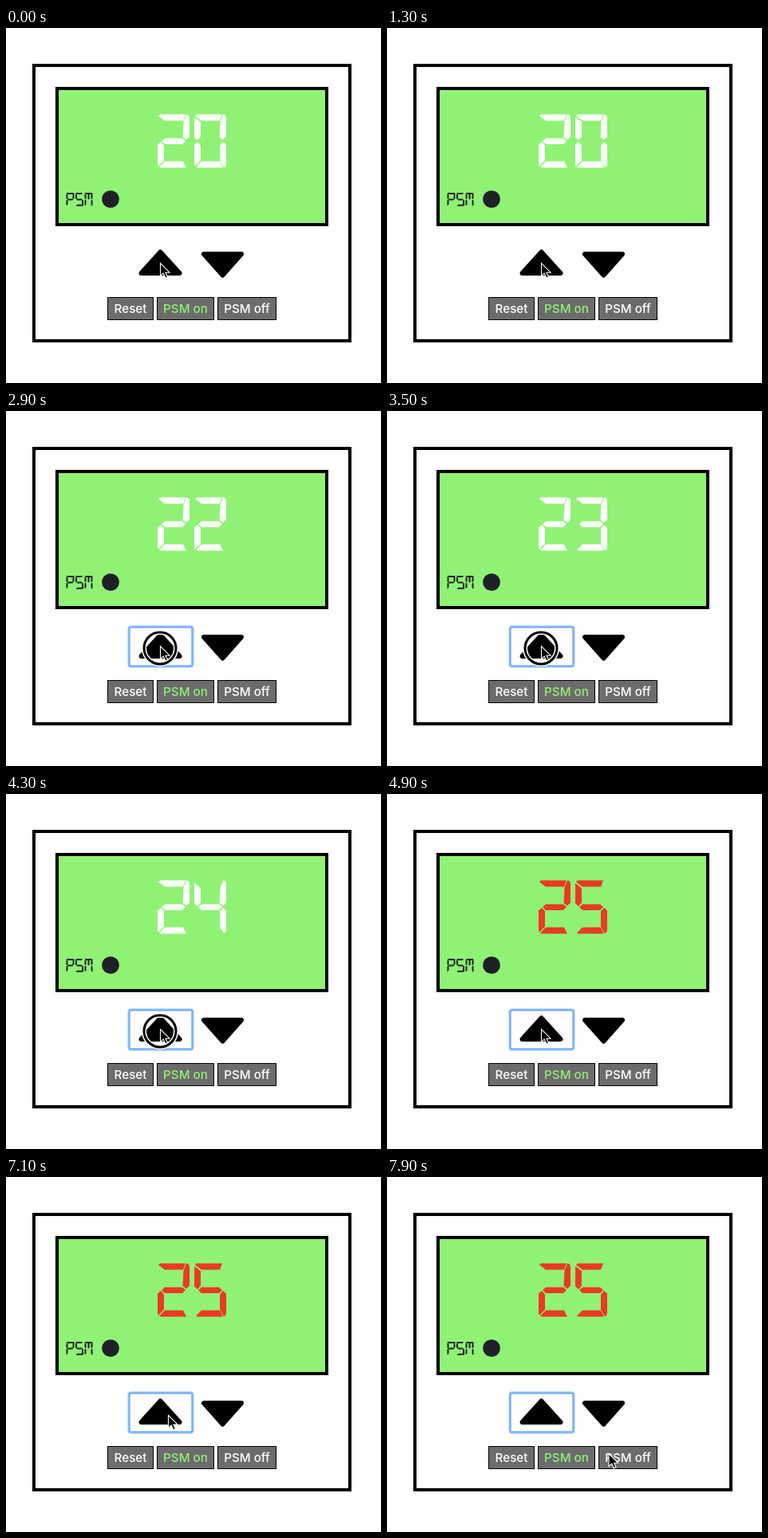
Recreate the animation shown at these times as an HTML page. Size 470 by 446 pixels, loop 8000 ms.

```html
<!DOCTYPE html>
<html lang="en">
<head>
<meta charset="utf-8">
<title>Thermostat</title>
<style>
  html, body { margin: 0; width: 100%; height: 100%; overflow: hidden; background: #fff; }
  svg { display: block; }
  .button rect { fill: #6c6c6c; stroke: #000; }
  .button text { font: 500 15.2px Inter, sans-serif; fill: #fff; text-anchor: middle; }
  .button.on text { fill: #8ff275; }
  .arrow { stroke: #000; stroke-width: 6; stroke-linejoin: round; }
  .ring, .focus { fill: none; }
</style>
</head>
<body>
<svg width="470" height="446" viewBox="0 0 470 446">
  <rect x="35" y="47" width="396" height="346" fill="#fff" stroke="#000" stroke-width="4"/>
  <rect x="64" y="76" width="338" height="171" fill="#8ff275" stroke="#000" stroke-width="4"/>
  <path id="tens" transform="translate(190 108.5)"/>
  <path id="units" transform="translate(236 108.5)"/>
  <g id="label" fill="#202124" aria-label="PSM"></g>
  <circle cx="131" cy="215" r="10.8" fill="#202028"/>

  <path class="arrow" d="M193.5 281.5 217.5 308H169.5Z"/>
  <path class="arrow" d="M248 284H295L271.5 310.5Z"/>
  <g id="focus" class="focus">
    <rect x="154" y="271" width="80" height="50" rx="2.5" stroke="#b5d3fa" stroke-width="3.5"/>
    <rect x="154.5" y="271.5" width="79" height="49" rx="2" stroke="#72adf6" stroke-width="2"/>
  </g>

  <g class="button"><rect x="127.5" y="338.5" width="57" height="28"/><text x="156" y="358">Reset</text></g>
  <g class="button on"><rect x="189.5" y="338.5" width="71" height="28"/><text x="225" y="358">PSM on</text></g>
  <g class="button"><rect x="265.5" y="338.5" width="73" height="28"/><text x="302" y="358">PSM off</text></g>

  <g id="ring" class="ring">
    <circle cx="193" cy="298" r="20" stroke="#fff" stroke-width="6"/>
    <circle cx="193" cy="298" r="20" stroke="#000" stroke-width="3"/>
  </g>
  <path id="cursor" d="M0 0V16L3.7 12.6 6.3 18.5 9 17.3 6.5 11.7H11.5Z" stroke="#fff" stroke-width="1.1"/>
</svg>
<script>
const LOOP = 8000, STEP = 100;
const $ = id => document.getElementById(id);

// Segments of one 40 x 67 character; m is the middle bar of the letter M
const segments = {
  a: 'M1 2 3 0H35L32 8H9Z',
  b: 'M36 0 39 1 40 4V28L36 32 31.5 28.5 32.5 9Z',
  c: 'M36 34.5 40 38V62L39 66 36.5 66 32 58V39Z',
  d: 'M2 66 9 59H32L36 67H4Z',
  e: 'M4 34.5 8 39V58L1 65 0 63V38Z',
  f: 'M0 3.5 8 9.5V28L4 32.5 0 29Z',
  g: 'M5 33.5 9 30H31L35 33.5 31 37.5H9Z',
  m: 'M16 8H24V33H16Z'
};
const digits = ['abcdef', 'bc', 'abged', 'abgcd', 'fgbc', 'afgcd'];
const glyph = names => [...names].map(n => segments[n]).join('');

$('label').innerHTML = ['abefg', 'acdfg', 'abcefm'].map((names, i) =>
  `<path transform="translate(${75.5 + i * 11.5} 207) scale(.25)" d="${glyph(names)}"/>`).join('');

// Mouse presses: down, up, time the ring is gone
const presses = [
  [700, 800, 1000], [1400, 1600, 1600], [2200, 2300, 2300], [2900, 3000, 3100],
  [3500, 3700, 4000], [4300, 4400, 4500], [6200, 6600, 6900]
];
// Pointer path: time, x, y
const path = [[7000, 193.5, 295.5], [7300, 232, 310], [7600, 308, 338], [7900, 278, 347.5]];

function ringOpacity(t) {
  const press = presses.find(([down, , gone]) => t >= down && t < gone);
  if (!press) return 0;
  const [, up, gone] = press;
  return t < up ? 1 : (gone - t) / (gone - up + STEP);
}

function pointer(t) {
  if (t <= path[0][0]) return path[0].slice(1);
  const i = path.findIndex(p => t <= p[0]);
  const [t0, x0, y0] = path[i - 1], [t1, x1, y1] = path[i];
  const k = (t - t0) / (t1 - t0), s = k * k * (3 - 2 * k);
  return [x0 + (x1 - x0) * s, y0 + (y1 - y0) * s];
}

function draw(now) {
  const t = Math.floor(now % LOOP / STEP) * STEP;
  // The first press only activates the window, the last one is at the maximum
  const degrees = 20 + presses.slice(1, 6).filter(p => t >= p[1]).length;
  const color = degrees < 25 ? '#fff' : '#e93a22';
  $('tens').setAttribute('d', glyph(digits[2]));
  $('units').setAttribute('d', glyph(digits[degrees % 10]));
  $('tens').setAttribute('fill', color);
  $('units').setAttribute('fill', color);
  $('focus').setAttribute('opacity', t >= 1400 ? 1 : 0);
  $('ring').setAttribute('opacity', ringOpacity(t));
  $('cursor').setAttribute('transform', `translate(${pointer(t)})`);
}

const start = performance.now();
(function tick() {
  draw(performance.now() - start);
  requestAnimationFrame(tick);
})();
</script>
</body>
</html>
```
